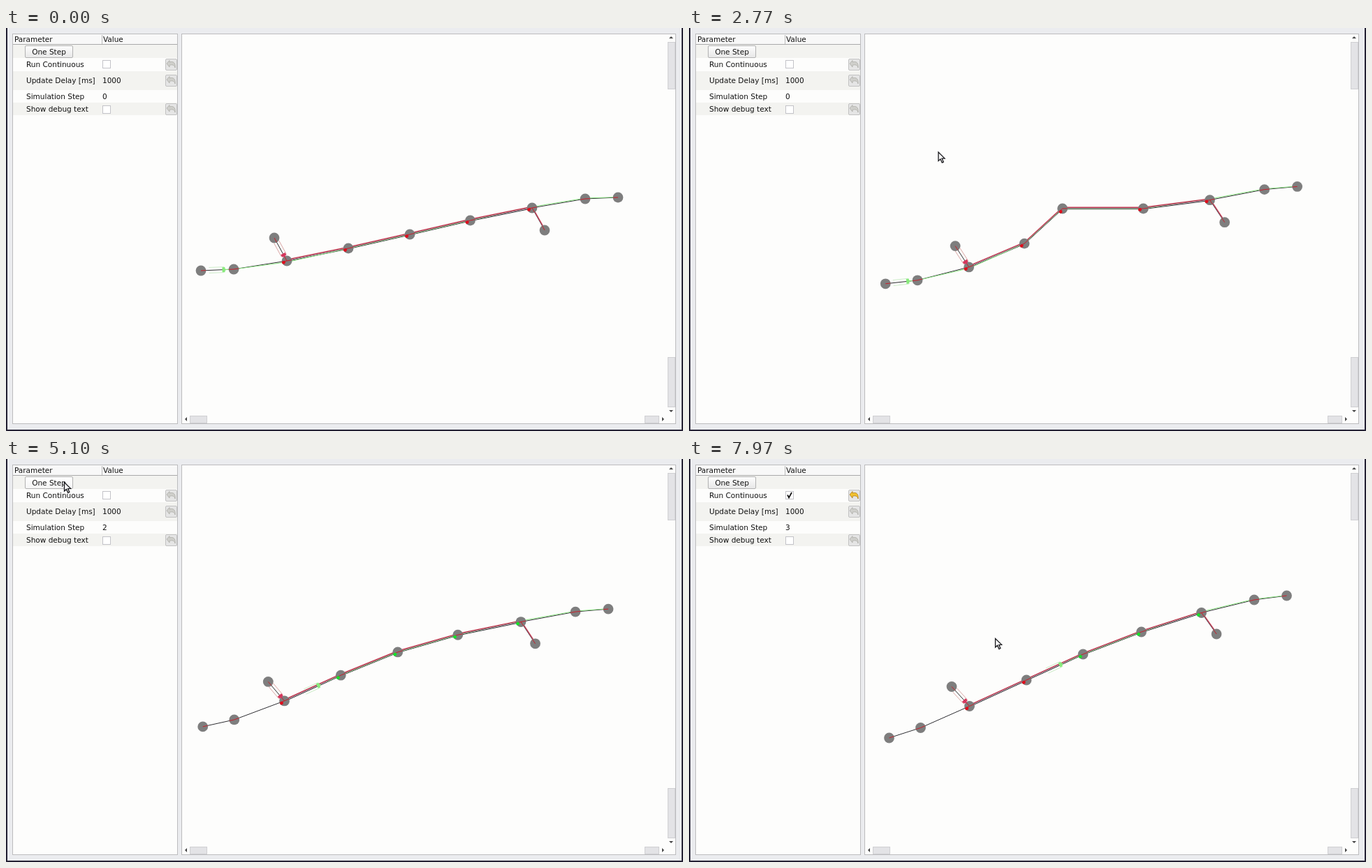
These frames come from a looping animation (969x578 px, 8 s). An HTML page with a canvas:

```html
<!DOCTYPE html>
<html lang="en">
<head>
<meta charset="utf-8">
<title>Lane simulation</title>
<style>
  html, body { margin: 0; width: 100%; height: 100%; overflow: hidden; }
  body { position: relative; background: #ebecef; font: 10.5px "DejaVu Sans", sans-serif; color: #111; }
  body *, body::after { position: absolute; box-sizing: border-box; }
  body::after { content: ""; inset: 0; border: solid #252235; border-width: 0 2px 2px; }
  .panel { background: #fdfdfc; border: 1px solid #bcbcbe; }
  .row { left: 10px; width: 235px; }
  .odd { background: #f3f3f0; }
  .text { line-height: 16px; white-space: pre; }
  .header { top: 9px; height: 15px; background: #f8f8f8; border-bottom: 1px solid #aaa; }
  .divider { left: 137px; top: 10px; width: 1px; height: 13px; background: #bbb; }
  #button { left: 27px; top: 25px; width: 69px; height: 18px; border: 1px solid #b2b2b2; border-radius: 2px;
    background: linear-gradient(#fdfdfd, #e8e8e8); text-align: center; line-height: 17px; }
  #button.hover { background: linear-gradient(#fff, #f4f4f4); }
  .box { left: 138px; width: 12px; height: 12px; background: #fff; border: 1px solid #c3c3c8; }
  .undo { left: 228px; width: 17px; height: 17px; background: #e5e5e5; border: 1px solid #c2c2c2; border-radius: 2px; }
  .undo path { fill: #cfcfcb; stroke: #adada8; stroke-width: .8; }
  .undo.on path { fill: #f2c230; stroke: #b07a10; }
  .groove { background: #e3e3e6; border: 1px solid #cfcfd2; }
  .arrow { width: 0; height: 0; border: 3px solid transparent; }
  svg, canvas { left: 0; top: 0; }
</style>
</head>
<body>
<div class="panel" style="left:9px;top:8px;width:237px;height:560px"></div>
<div class="row header"></div><div class="divider"></div>
<div class="row odd" style="top:24px;height:19px"></div>
<div class="row odd" style="top:62px;height:27px"></div>
<div class="row odd" style="top:107px;height:18px"></div>
<div class="text" style="left:12px;top:8px">Parameter</div>
<div class="text" style="left:139px;top:8px">Value</div>
<div id="button">One Step</div>
<div class="text" style="left:29px;top:44px">Run Continuous</div>
<div class="text" style="left:29px;top:67px">Update Delay [ms]</div>
<div class="text" style="left:138px;top:67px">1000</div>
<div class="text" style="left:29px;top:90px">Simulation Step</div>
<div class="text" id="step" style="left:138px;top:90px">0</div>
<div class="text" style="left:29px;top:108px">Show debug text</div>
<div class="box" style="top:46px"><svg id="check" width="10" height="10"><path d="M2 4.5L4 8.5L8 1" fill="none" stroke="#111" stroke-width="1.7"/></svg></div>
<div class="box" style="top:111px"></div>

<div class="panel" style="left:251px;top:8px;width:708px;height:560px"></div>
<div class="groove" style="left:947px;top:20px;width:11px;height:68px"></div>
<div class="groove" style="left:947px;top:472px;width:11px;height:72px"></div>
<div class="groove" style="left:263px;top:556px;width:25px;height:11px"></div>
<div class="groove" style="left:914px;top:556px;width:21px;height:11px"></div>
<div class="arrow" style="left:949px;top:9px;border-bottom-color:#444"></div>
<div class="arrow" style="left:949px;top:548px;border-top-color:#444"></div>
<div class="arrow" style="left:253px;top:558px;border-right-color:#444"></div>
<div class="arrow" style="left:939px;top:558px;border-left-color:#444"></div>
<canvas id="view" width="969" height="578"></canvas>

<script>
const LOOP = 8000, GRAB = 1150, DROP = 2400, CHECK = 7450;
const STEPS = [3950, 4850, 6100];
const ctx = document.getElementById('view').getContext('2d');
const byId = id => document.getElementById(id);

// Chain nodes 0-8, then the entry (9) and exit (10) branches.
const poses = [
  [0, '279,348 326,346 402,334 490,316 578,296 664.5,276 753,258 829,245 876,243 384,301 771,290'],
  [2070, '281.5,361.5 328,357 403.5,341 487,312 520,248 657,264.5 751,251 827,235 873,231 384,309.5 770.5,282.5'],
  [3530, '281,372.5 326,367 397.5,345 472.5,306 550.5,271 643,253 739.5,242 820,228 868,223.5 378,316 762.5,274.5'],
  [4470, '281,380 326,371 398,345.5 477.5,308 559,275.5 646,252.5 738,237 816.5,223 864,219 375.5,318 758.5,268'],
  [5770, '282.5,388 327.5,377 399,348.5 481,312.5 562.5,278.5 647.5,252 736,230 813.5,215 860,211 375,321 756.5,261.5'],
  [7970, '286.5,400 331.5,385.5 401.5,354.5 483,317 564,280 647.5,248 733.5,220.5 809,202 855.5,196 376,326.5 755,251']
].map(([t, s]) => [t, s.split(' ').map(p => p.split(',').map(Number))]);

const pointer = [
  [300, [640, 592]], [900, [571, 298]], [GRAB, [569, 297]], [1900, [511, 249]], [DROP, [511, 249]],
  [3300, [93, 56]], [3530, [95, 51]], [3750, [83, 33]], [6250, [83, 33]], [6700, [160, 78]],
  [7150, [142, 50]], [7560, [142, 50]], [7970, [438, 257]]
];

const mix = (a, b, u) => a.map((v, i) => v + (b[i] - v) * u);
const smooth = u => u * u * (3 - 2 * u);

function locate(keys, t) {
  let i = 0;
  while (i < keys.length - 2 && t >= keys[i + 1][0]) i++;
  const [t0, a] = keys[i], [t1, b] = keys[i + 1];
  return [a, b, Math.max(0, Math.min(1, (t - t0) / (t1 - t0)))];
}

function cursorAt(t) {
  const [a, b, u] = locate(pointer, t);
  return mix(a, b, smooth(u));
}

function nodesAt(t) {
  const [a, b, u] = locate(poses, t);
  const nodes = a.map((p, i) => mix(p, b[i], u));
  if (t < GRAB) nodes[4] = poses[0][1][4];
  else if (t < DROP) {
    const [x, y] = cursorAt(t);
    nodes[4] = [x + 9, y - 1];
  } else if (t < 3530) {
    const k = (1 - Math.exp(-1.3 * (t - DROP) / (3530 - DROP))) / (1 - Math.exp(-1.3));
    nodes[4] = mix([520, 248], poses[2][1][4], k);
  }
  return nodes;
}

function line(points, color, width = 1, dy = 0) {
  ctx.beginPath();
  points.forEach(([x, y]) => ctx.lineTo(x, y + dy));
  ctx.strokeStyle = color;
  ctx.lineWidth = width;
  ctx.stroke();
}

// Runs draw() with the origin at p and the x axis along a -> b.
function along(a, b, p, draw) {
  ctx.save();
  ctx.translate(...p);
  ctx.rotate(Math.atan2(b[1] - a[1], b[0] - a[0]));
  draw();
  ctx.restore();
}

function fill(color, points) {
  ctx.beginPath();
  points.forEach(p => ctx.lineTo(...p));
  ctx.closePath();
  ctx.fillStyle = color;
  ctx.fill();
}

function vehicle(a, b, body, outline) {
  along(a, b, mix(a, b, .5), () => {
    line([[-12, -4], [10, -4]], outline, .8);
    line([[-12, 4], [10, 4]], outline, .8);
    fill(body, [[7, -3.5], [11, -3.5], [11, -1.5], [13.5, 0], [11, 1.5], [11, 3.5], [7, 3.5]]);
  });
}

function drawGraph(n, step, held) {
  const links = [[0, 1], [1, 2], [2, 3], [3, 4], [4, 5], [5, 6], [6, 7], [7, 8], [9, 2], [6, 10]];
  const inner = n.slice(2, 7);
  const green = '#8fe886', crimson = '#c54458';
  ctx.lineJoin = 'round';

  links.forEach(([a, b], i) => line([n[a], n[b]], '#2c2c30', 1, i > 1 && i < 6 ? .8 : 0));
  const front = mix(n[step], n[step + 1], .75);
  const shift = [0, 0, 1.8, 0, 0, 0, -1.5, -1, -.5];
  const route = [front, ...n.slice(step + 1, 9).map(([x, y], i) => [x, y + shift[step + 1 + i]])];
  line(route, green, 1);
  line([...inner, n[10]], '#77506e', 1, -.7);
  line([...inner, n[10]], crimson, 1.4, -1.7);

  n.forEach(([x, y], i) => {
    ctx.beginPath();
    ctx.arc(x, y, 7.4, 0, 7);
    ctx.fillStyle = held && i === 4 ? '#ffff00' : '#7e7e7e';
    ctx.fill();
  });
  for (const [a, b] of links) {
    const reach = 7 / Math.hypot(n[b][0] - n[a][0], n[b][1] - n[a][1]);
    line([n[a], mix(n[a], n[b], reach)], '#c91f2b', 1);
    line([n[b], mix(n[b], n[a], reach)], '#c91f2b', 1);
  }

  for (let i = 2; i < 7; i++) {
    const open = step > 0 && i > step;
    along(n[i - 1], n[i], n[i], () =>
      fill(open ? '#14e32a' : '#e00d1c', [[-7.5, .5], [-4, -1], [-2, 1.5], [-4, 4], [-7, 3.2]]));
  }
  vehicle(n[step], n[step + 1], '#88ea7c', '#c4eabf');
  vehicle(n[9], n[2], '#d5365c', '#d69a98');
}

function drawCursor([x, y]) {
  ctx.save();
  ctx.translate(x, y);
  ctx.lineJoin = 'miter';
  fill('#fafafa', [[.5, .5], [.5, 13], [3.4, 10.4], [5.8, 15.5], [7.8, 14.5], [5.6, 9.5], [9.5, 9.4]]);
  ctx.strokeStyle = '#17171b';
  ctx.lineWidth = 1.3;
  ctx.stroke();
  ctx.restore();
}

for (const top of [43.5, 66.5, 107.5]) {
  document.body.insertAdjacentHTML('beforeend',
    `<div class="undo" style="top:${top}px"><svg width="15" height="15"><path d="M1 6L5 1.5V4C10 2 14 5 13 12C12 8 9 7 5 8.5V11Z"/></svg></div>`);
}
const undo = document.querySelector('.undo');
document.body.append(byId('view'));

function render(now) {
  const t = now % LOOP;
  const step = STEPS.filter(s => t >= s).length;
  const checked = t >= CHECK;
  const cursor = cursorAt(t);
  byId('step').textContent = step;
  byId('check').style.visibility = checked ? 'visible' : 'hidden';
  undo.classList.toggle('on', checked);
  byId('button').classList.toggle('hover', cursor[0] > 27 && cursor[0] < 96 && cursor[1] > 25 && cursor[1] < 43);
  ctx.clearRect(0, 0, 969, 578);
  drawGraph(nodesAt(t), step, t >= 950 && t < DROP);
  drawCursor(cursor);
  requestAnimationFrame(render);
}
requestAnimationFrame(render);
</script>
</body>
</html>
```
